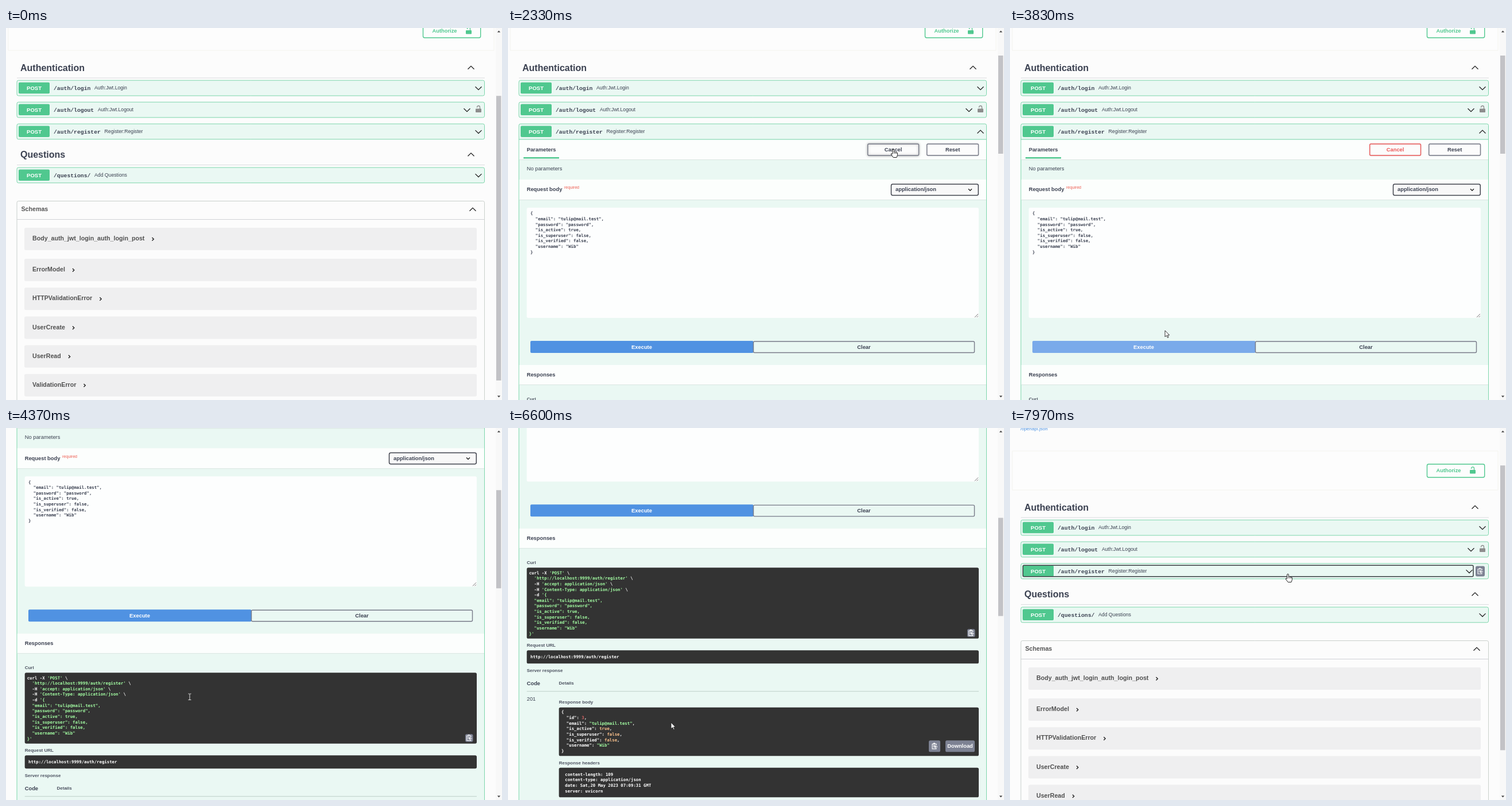
Recreate the animation shown at these times as an HTML page with a canvas. Size 864 by 648 pixels, loop 8 s.

```html
<!DOCTYPE html>
<html lang="en">
<head>
<meta charset="utf-8">
<title>API docs</title>
<style>
html, body { margin: 0; width: 100%; height: 100%; overflow: hidden; background: #fcfcfc; }
canvas { display: block; }
</style>
</head>
<body>
<canvas id="stage" width="864" height="648"></canvas>
<script>
const ctx = document.getElementById('stage').getContext('2d');
const SANS = '"Liberation Sans", Arial, sans-serif';
const MONO = '"DejaVu Sans Mono", monospace';
const SLAB = '"Liberation Mono", monospace';
const INK = '#3b4151', GREEN = '#50c88f', EDGE = '#7dd6ab', MINT = '#eaf8f3', DARK = '#333', GREY = '#777a88';
const LOOP = 8000, OPEN = 760, TRY = 2280, CLOSE = 7350;
const CODE_SIZE = 7.33, CODE_ADVANCE = 4.413, CODE_PITCH = 9.63;
const EMAIL = 'tulip@mail.test', USER = 'Wib';

const body = (email, password, user) => ['{', `  "email": "${email}",`, `  "password": "${password}",`,
  '  "is_active": true,', '  "is_superuser": false,', '  "is_verified": false,', `  "username": "${user}"`, '}'];
const request = body(EMAIL, 'password', USER);
const example = body('user@example.com', 'string', 'string');
const response = request.map((line, i) => i === 2 ? `  "email": "${EMAIL}",` : i === 1 ? '  "id": 3,' : line);
const url = 'http://localhost:9999/auth/register';
const curl = ["curl -X 'POST' \\", `  '${url}' \\`, "  -H 'accept: application/json' \\",
  "  -H 'Content-Type: application/json' \\", "  -d '{", ...request.slice(1, -1), "}'"];
const headers = ['content-length: 109', 'content-type: application/json',
  'date: Sat,20 May 2023 07:09:31 GMT', 'server: uvicorn'];

// time, x, y of the pointer's hot spot
const pointerPath = [
  [300, 470, 650], [650, 480, 181], [820, 480, 181], [1500, 620, 270], [1900, 671, 211], [2400, 671, 211],
  [2800, 560, 330], [3300, 292, 552], [3600, 286, 552], [3830, 270, 527], [4370, 320, 468], [4900, 260, 482],
  [5270, 176, 491], [5550, 78, 500], [5800, 130, 550], [6100, 190, 472], [6600, 284, 513], [6950, 450, 330],
  [7250, 484, 249], [7420, 484, 249], [7740, 490, 392], [7970, 484, 254], [8000, 484, 254]
];

const ease = (t, from, to) => {
  const u = Math.min(1, Math.max(0, (t - from) / (to - from)));
  return u * u * (3 - 2 * u);
};
const mix = (a, b, u) => `rgb(${a.map((v, i) => Math.round(v + (b[i] - v) * u))})`;
const scrollAt = t => 413.5 * ease(t, 3964, 4724) - 482.5 * ease(t, 6589, 6920);

function pointerAt(t) {
  const i = pointerPath.findIndex(p => p[0] > t);
  if (i < 1) return null;
  const [a, b] = [pointerPath[i - 1], pointerPath[i]], u = ease(t, a[0], b[0]);
  return { x: a[1] + (b[1] - a[1]) * u, y: a[2] + (b[2] - a[2]) * u };
}

// y is the middle of the capitals
function text(str, x, y, size, { color = INK, bold = true, align = 'left', family = SANS } = {}) {
  ctx.font = `${bold ? 'bold ' : ''}${size}px ${family}`;
  ctx.fillStyle = color;
  ctx.textAlign = align;
  ctx.fillText(str, x, y + size * 0.36 - 0.6);
  return ctx.measureText(str).width;
}

function box(x1, y1, x2, y2, fill, stroke, radius = 0, width = 1.33) {
  ctx.beginPath();
  ctx.roundRect(x1, y1, x2 - x1, y2 - y1, radius);
  if (fill) { ctx.fillStyle = fill; ctx.fill(); }
  if (stroke) { ctx.strokeStyle = stroke; ctx.lineWidth = width; ctx.stroke(); }
}

function path(d, x, y, stroke, width = 1.4, fill) {
  ctx.save();
  ctx.translate(x, y);
  const p = new Path2D(d);
  if (fill) { ctx.fillStyle = fill; ctx.fill(p); }
  if (stroke) { ctx.strokeStyle = stroke; ctx.lineWidth = width; ctx.stroke(p); }
  ctx.restore();
}

const chevron = (x, y, up) => path(up ? 'M-5.5 2.7L0 -2.7L5.5 2.7' : 'M-5.5 -2.7L0 2.7L5.5 -2.7', x, y, '#222', 1.3);

function lock(x, y, color) {
  box(x - 5, y - 1, x + 5, y + 5.5, color, null, 1);
  path('M-2.5 -3V-3.6A2.5 2.5 0 0 1 2.5 -3.6V0', x, y, color, 1.3);
}

function clipboard(x1, y1, x2, y2) {
  box(x1, y1, x2, y2, '#7d8293', null, 2.7);
  path('M-4 -4H3V-1M-4 -4V4.5H3V3M-2 -5.2H1M-2.5 -1.5H1M-2.5 1H-0.5M5 1H0M2 -1L0 1L2 3',
    (x1 + x2) / 2, (y1 + y2) / 2, '#fff', 1.1);
}

function button(x1, y1, x2, y2, label, color, glow) {
  ctx.save();
  ctx.shadowColor = glow ? 'rgba(0,0,0,.3)' : 'rgba(0,0,0,.1)';
  ctx.shadowBlur = glow ? 4 : 2;
  box(x1, y1, x2, y2, '#fcfcfc', glow ? GREY : color, 2, 1.4);
  ctx.restore();
  text(label, (x1 + x2) / 2, (y1 + y2) / 2, 9.33, { align: 'center', color: color === GREY ? INK : color });
}

// each line is cut into [string, color] segments
function code(lines, x, y, segments) {
  lines.forEach((line, i) => {
    let column = 0;
    for (const [str, color] of segments(line)) {
      text(str, x + column * CODE_ADVANCE, y + i * CODE_PITCH, CODE_SIZE, { color, family: MONO });
      column += str.length;
    }
  });
}
const plain = color => line => [[line, color]];
const shell = line => line.match(/'[^']*'?|[^']+/g).map(s => [s, /['"}]/.test(s) ? '#a2fca2' : '#fff']);
const json = line => {
  const [, key = '', value, comma] = line.match(/^(.*?: )?(.*?)(,?)$/);
  const color = /^"/.test(value) ? '#a2fca2' : /^\d/.test(value) ? '#d36363' : /^[tf]/.test(value) ? '#fcc28c' : '#fff';
  return [[key, '#fff'], [value, color], [comma, '#fff']];
};

function section(title, y) {
  text(title, 25, y, 16);
  chevron(810, y - 0.5, true);
  box(19, y + 17, 834, y + 18, '#dcdddf');
}

function operation(y, route, summary, { locked, hover, open } = {}) {
  if (!open) box(19, y - 13.5, 833.5, y + 13.3, MINT, EDGE, 2.7, 1);
  box(22, y - 10, 76, y + 9.5, GREEN, null, 2);
  text('POST', 49, y + 0.3, 9.5, { color: '#fff', align: 'center' });
  const width = text(route, 83, y + 0.5, 9.75, { family: SLAB });
  text(summary, 83 + width + 6.7, y, 8.67, { bold: false });
  chevron(hover ? 800 : locked ? 803 : 823, y + 0.3, open);
  if (locked) lock(823, y - 1, '#8d8d8d');
  if (hover) {
    box(22.5, y - 10.3, 807, y + 9.3, null, '#3a3f42', 2, 1.5);
    clipboard(811, y - 9, 827, y + 9);
  }
}

function band(y1, y2) {
  box(19.7, y1, 833, y2, '#fcfefd');
  box(19.7, y2, 833, y2 + 1, '#d9e5e1');
}

function pageTop() {
  text('/openapi.json', 18, -67.5, 8, { bold: false, color: '#4990e2' });
  box(4, -29, 850, 39, '#fdfdfd', '#f3f3ee', 0, 1);
  box(726.5, -6, 826.7, 17, '#fdfdfd', GREEN, 2.7, 1.4);
  text('Authorize', 742.5, 5.5, 9.33, { color: GREEN });
  lock(806, 5, GREEN);
  section('Authentication', 69.5);
  operation(104.7, '/auth/login', 'Auth:Jwt.Login');
  operation(142.6, '/auth/logout', 'Auth:Jwt.Logout', { locked: true });
}

function pageBottom() {
  section('Questions', 221);
  operation(256.5, '/questions/', 'Add Questions');
  box(19, 301.5, 833.5, 656, '#fcfcfc', '#c9d0cc', 2.7, 1);
  text('Schemas', 26.5, 315.5, 10.67, { color: '#555' });
  chevron(813, 316, true);
  box(19, 333, 833, 334, '#d0d2d6');
  const schemas = ['Body_auth_jwt_login_auth_login_post', 'ErrorModel', 'HTTPValidationError',
    'UserCreate', 'UserRead', 'ValidationError'];
  schemas.forEach((name, i) => {
    const y = i ? 370.8 + 50.2 * i : 367;
    box(32, y - 19, 820, y + 20, '#efeff0', null, 2.7);
    const width = text(name, 46, y, 10.67, { color: '#505050' });
    path('M-1.4 -2.7L1.4 0L-1.4 2.7', 60.5 + width, y + 0.8, '#222', 1.4);
  });
}

function requestForm(t, trying, hover) {
  box(19, 167, 833.5, 2000, MINT, EDGE, 2.7, 1);
  operation(180.5, '/auth/register', 'Register:Register', { open: true, hover });
  box(19, 193.5, 833, 194.5, EDGE);
  band(195, 229);
  text('Parameters', 32.7, 212, 9.33);
  box(27, 225, 89, 227.5, GREEN);
  const red = mix([59, 65, 81], [236, 88, 88], ease(t, 2340, 2640));
  button(626.7, 202, 715.5, 222, trying ? 'Cancel' : 'Try it out', trying ? red : GREY, t > 1850 && t < 2500);
  button(729.7, 202, 819.5, 222, 'Reset', GREY);
  text('No parameters', 32.7, 245, 9.33, { bold: false });
  band(264, 299);
  text('Request body', 32.7, 281.5, 9.33);
  text('required', 98, 278.5, 7.1, { bold: false, color: '#ee5a4f' });
  box(667.5, 272, 819.3, 291.5, '#f8f8f8', '#41444e', 2.7, 1.5);
  text('application/json', 675, 281.5, 9.33);
  path('M-3 -1.5L0 1.5L3 -1.5', 805, 281.7, '#222', 1.4);

  if (!trying) {
    text('Example Value', 32.7, 319, 8);
    text('|', 95, 319, 8, { bold: false });
    text('Schema', 101, 319, 8, { bold: false });
    box(32.7, 331, 820, 420, DARK, null, 2.7);
    code(example, 39, 341, json);
    return;
  }
  box(32.7, 313, 820, 505, '#fdfefe', null, 2.7);
  code(request, 39, 323.3, plain(INK));
  path('M-6 0L0 -6M-2.5 0L0 -2.5', 819, 504, '#777', 1);
  const light = ease(t, 3320, 3480) - ease(t, 3840, 4100);
  box(39, 545, 427.5, 566, mix([80, 146, 226], [122, 170, 234], light), null, 2);
  text('Execute', 233, 556, 9.33, { color: '#fff', align: 'center' });
  box(427.5, 546, 812.5, 565.5, null, GREY, 2, 1.4);
  text('Clear', 620, 556, 9.33, { align: 'center' });
}

function responses() {
  const label = (str, x, y) => text(str, x, y, 8, { color: '#4d5361' });
  band(587, 621);
  text('Responses', 32.7, 604, 9.33);
  label('Curl', 32.7, 646.5);
  box(32.7, 655, 820, 778.5, DARK, null, 2.7);
  code(curl, 36.7, 664.3, shell);
  clipboard(800, 762, 813.5, 775.5);
  label('Request URL', 32.7, 790.5);
  box(32.7, 799, 820, 822, DARK, null, 2.7);
  code([url], 39, 811, plain('#fff'));
  label('Server response', 32.7, 834);
  text('Code', 32.7, 856.5, 9.33);
  label('Details', 88.5, 856.3);
  box(32.7, 870, 820, 871, '#bccfc8');
  text('201', 32.7, 883.5, 9.33, { bold: false });
  label('Response body', 88.7, 889.3);
  box(88.7, 898.3, 820, 983, DARK, null, 2.7);
  code(response, 93, 907, json);
  clipboard(733, 956, 753, 976);
  box(762, 956, 813, 976, '#7d8293', null, 2.7);
  text('Download', 787.5, 966.3, 9.33, { color: '#fff', align: 'center' });
  label('Response headers', 88.7, 995);
  box(88.7, 1003.3, 820, 1055, DARK, null, 2.7);
  code(headers, 99.3, 1015.3, plain('#fff'));
}

function scrollbar(scroll, height) {
  const scale = 626 / height, top = 11 + (140 + scroll) * scale;
  box(853, 0, 864, 648, '#f8f8f8');
  box(854, top, 862.5, top + 648 * scale, '#c2c2c6');
  path('M-2.7 1.5L0 -1.5L2.7 1.5Z', 858.5, 6, null, 0, '#444');
  path('M-2.7 -1.5L0 1.5L2.7 -1.5Z', 858.5, 642, null, 0, '#444');
}

function drawPointer({ x, y }, scroll, open, trying) {
  const py = y + scroll;
  const inside = (x1, y1, x2, y2) => x > x1 && x < x2 && py > y1 && py < y2;
  if (inside(19, 167, 833, 194) || open && inside(626, 202, 716, 222) || trying && inside(39, 545, 813, 566)) {
    path('M-1.3 1Q0 -0.8 1.3 1V5Q2.5 4 3.6 5.3Q5 4.4 5.8 6Q7.2 5.4 7.4 7V10.5L6 14.5H0.2L-3.8 9Q-4 7 -1.3 8.4Z',
      x, y, '#222', 1, '#fff');
    path('M1.3 5V8M3.6 5.5V8M5.7 6.2V8', x, y, '#222', 0.8);
  } else if (trying && (inside(32, 313, 820, 505) || inside(32, 655, 820, 778))) {
    path('M-2.5 -5H-0.5L0 -4.5L0.5 -5H2.5M0 -4.5V5M-2.5 5.5H2.5', x, y, py > 600 ? '#ddd' : '#222', 1);
  } else {
    path('M0 0V11L2.6 8.6L4.5 12.5L6.2 11.7L4.4 8H7.7Z', x, y, '#222', 0.9, '#fff');
  }
}

function draw(t) {
  const scroll = scrollAt(t), open = t >= OPEN && t < CLOSE, trying = open && t >= TRY;
  const pointer = pointerAt(t);
  const hover = !!pointer && pointer.y + scroll > 167 && pointer.y + scroll < 194;
  box(0, 0, 864, 648, '#fcfcfc');
  ctx.save();
  ctx.translate(0, -scroll);
  pageTop();
  if (open) {
    requestForm(t, trying, hover);
    if (!trying) ctx.translate(0, -140);
    responses();
  } else {
    operation(180.5, '/auth/register', 'Register:Register', { hover });
    pageBottom();
  }
  ctx.restore();
  scrollbar(scroll, !open ? 818 : trying ? 2372 : 2232);
  if (pointer) drawPointer(pointer, scroll, open, trying);
}

const start = performance.now();
function tick() {
  draw((performance.now() - start) % LOOP);
  requestAnimationFrame(tick);
}
tick();
</script>
</body>
</html>
```
